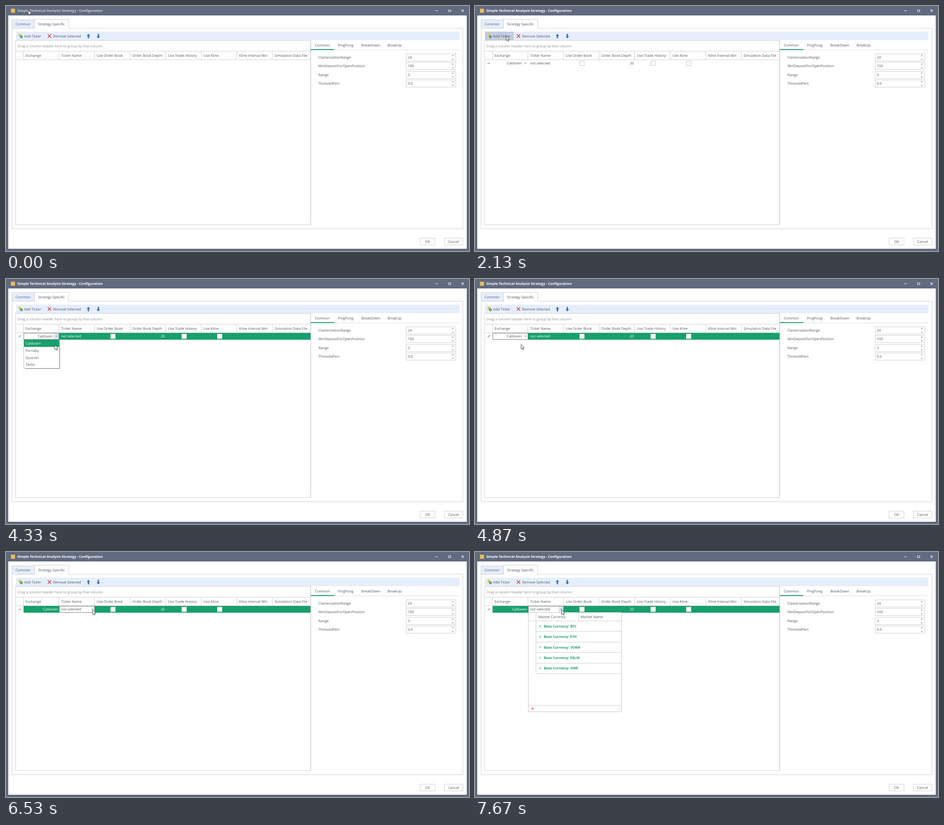
These frames come from a looping animation (1028 by 545 pixels, 8 s). An HTML page:

```html
<!DOCTYPE html>
<html lang="en">
<head>
<meta charset="utf-8">
<title>Strategy configuration</title>
<style>
  html, body { margin: 0; width: 100%; height: 100%; overflow: hidden; background: #626a80; }
  svg { display: block; width: 1028px; height: 545px; }
  text { font: 7.8px "Open Sans", "Noto Sans", sans-serif; fill: #50535f; text-rendering: geometricPrecision; white-space: pre; }
  .bold { font-weight: 700; font-size: 7.65px; }
  .end { text-anchor: end; }
  .mid { text-anchor: middle; }
  .hint { fill: #8d8d8d; }
  .blue { fill: #4c5a86; }
  .inv { fill: #fff; }
  .green { fill: #18a06b; }
</style>
</head>
<body>
<svg id="stage" viewBox="0 0 1028 545"></svg>
<script>
const LINE = '#cfcfd2', GREEN = '#18a06b', BAR = '#e6eefc', HOT = '#c4cde1';
const LOOP = 8000, STEP = 200 / 3;

const text = (x, y, s, cls = '') => `<text x="${x}" y="${y}" class="${cls}">${s}</text>`;
const fill = (x, y, w, h, c) => `<rect x="${x}" y="${y}" width="${w}" height="${h}" fill="${c}"/>`;
const box = (x, y, w, h, c = LINE, bg = '#fff') =>
  `<rect x="${x + .5}" y="${y + .5}" width="${w - 1}" height="${h - 1}" fill="${bg}" stroke="${c}"/>`;
const hline = (x, y, w, c = LINE) => fill(x, y, w, 1, c);
const vline = (x, y, h, c = LINE) => fill(x, y, 1, h, c);
const path = (d, c, w = 1) => `<path d="${d}" fill="none" stroke="${c}" stroke-width="${w}"/>`;
const shape = (d, c) => `<path d="${d}" fill="${c}"/>`;
const group = (id, ...parts) => `<g id="${id}">${parts.join('')}</g>`;
const dropArrow = (x, y = 126.5) => shape(`M${x - 2} ${y}h4l-2 2z`, '#6b6e78');

const columns = [[39, 'Exchange'], [118, 'Ticker Name'], [197, 'Use Order Book'], [276, 'Order Book Depth'],
  [355, 'Use Trade History'], [434, 'Use Kline'], [513, 'Kline Interval Min'], [592, 'Simulation Data File']];
const checks = [232, 390, 469];
const exchanges = ['Caldoven', 'Fornaby', 'Quorsel', 'Tavlin'];
const bases = ['BTC', 'ETH', 'VORN', 'KELM', 'XMR'];

const titleBar = () => [
  fill(0, 0, 1028, 545, '#626a80'),
  fill(5, 21, 1018, 519, '#fff'),
  fill(11, 6, 9, 9, '#e9bd55'),
  `<g id="title">${text(25, 13, 'Simple Technical Analysis Strategy - Configuration', 'bold inv')}</g>`,
  fill(953, 10, 6, 1, '#fff'),
  path('M982.5 8.5h5v4h-5z', '#fff'),
  path('M1011.3 7.8l5 5m0-5l-5 5', '#fff', 1.1)
].join('');

const tabs = () => [
  box(13, 49, 1002, 447),
  box(13, 30, 51, 20, LINE, BAR),
  text(21, 42.7, 'Common', 'blue'),
  box(63, 29, 77, 21), fill(64, 48, 75, 3, '#fff'),
  text(71.3, 42.7, 'Strategy Specific')
].join('');

const toolbar = () => [
  fill(22, 57, 985, 19, BAR),
  group('hot', fill(22, 57, 64, 19, HOT)),
  '<circle cx="31" cy="65" r="3.3" fill="#f0bd4c"/><circle cx="34.2" cy="68.6" r="3" fill="#2f9a62"/>',
  text(34.2, 70.3, '$', 'mid inv').replace('<text', '<text style="font-size:4.5px"'),
  text(40.3, 69.7, 'Add Ticker'),
  path('M92.8 63l7.4 7.6m0-7.6l-7.4 7.6', '#d9363c', 1.5),
  text(104.7, 69.7, 'Remove Selected'),
  shape('M183 62l4 4.4h-2.6v5.6h-2.8v-5.6h-2.6z', '#3668c0'),
  shape('M205 72l4-4.4h-2.6v-5.6h-2.8v5.6h-2.6z', '#3668c0')
].join('');

const grid = () => [
  box(21, 76, 656, 411),
  fill(676, 76, 1, 411, '#b9b9bd'),
  text(25.5, 92.4, 'Drag a column header here to group by that column', 'hint'),
  hline(22, 100, 654), hline(22, 119, 654),
  ...columns.map(([x, s]) => vline(x - 1, 101, 18) + text(x + 4.5, 112.9, s))
].join('');

const settings = () => [
  hline(677, 97, 330, '#dddde0'), fill(677, 96, 52, 2, GREEN),
  ...[[685.7, 'Common'], [737, 'PingPong'], [789, 'BreakDown'], [847, 'BreakUp']].map(([x, s]) => text(x, 90.2, s)),
  ...[['ClasterizationRange', '24'], ['MinDepositForOpenPosition', '100'], ['Range', '3'], ['ThresoldPerc', '0.6']]
    .map(([name, value], i) => {
      const y = Math.round(114 + i * 19.3);
      return text(693.7, y + 3, name) + box(888, y - 8, 111, 17) + text(892.3, y + 3, value) +
        shape(`M990 ${y - 3}h4l-2-2z`, '#73757d') + shape(`M990 ${y + 4}h4l-2 2z`, '#73757d');
    }),
  box(919, 516, 34, 16), text(936, 526.6, 'OK', 'mid'),
  box(973, 516, 42, 16), text(993.7, 526.6, 'Cancel', 'mid')
].join('');

const rowCells = (cls, edge) => [
  text(352.5, 130, '20', 'end ' + cls),
  ...checks.map(x => box(x, 122, 11, 11, edge))
].join('');

const rows = () => [
  group('plain',
    group('comboHot', fill(107, 121, 10, 13, HOT)),
    text(104.2, 130, exchanges[0], 'end'), dropArrow(112),
    text(122.5, 130, 'not selected'), rowCells('', '#c6c6c9')),
  group('selected', fill(39, 120, 637, 15, GREEN), rowCells('inv', '#fff')),
  group('editExchange',
    box(39, 120, 79, 15, '#75817c'),
    group('comboOpen', fill(107, 121, 10, 13, '#dbe4f4')),
    text(104.2, 130, exchanges[0], 'end'), dropArrow(112),
    text(122.5, 130, 'not selected', 'inv')),
  group('editTicker',
    text(115.5, 130, exchanges[0], 'end inv'),
    box(118, 120, 79, 15, '#75817c'),
    group('tickerOpen', fill(186, 121, 10, 13, '#dbe4f4')),
    text(122.5, 130, 'not selected'), dropArrow(191.5)),
  group('arrow', path('M26.8 127.5h6m-2.3-2.2l2.3 2.2l-2.3 2.2', '#85878e', .9)),
  group('pencil', path('M28.3 129.7l4.6-4.6', '#a2a4a9', 2))
].join('');

const exchangeList = () => group('exchangeList',
  fill(43, 138, 77, 62, '#9b9b9b'),
  box(39, 135, 80, 64, '#bdbdc0'),
  fill(40, 135, 78, 16, GREEN),
  ...exchanges.map((s, i) => text(43.3, 146 + i * 15.8, s, i ? '' : 'inv')));

const tickerList = () => group('tickerList',
  box(118, 134, 208, 222, '#c6c6c9'),
  hline(119, 153, 206), vline(135, 135, 136), vline(230, 135, 18),
  text(140.5, 146.8, 'Market Currency'), text(234.5, 146.8, 'Market Name'),
  ...bases.map((s, i) => {
    const y = 165 + i * 23.4;
    return path(`M143.6 ${y - 1.9}l2 1.9l-2 1.9`, GREEN, 1.1) +
      text(152.7, y + 2.8, 'Base Currency: ' + s, 'bold green') + hline(136, Math.round(y + 11.3), 189);
  }),
  hline(119, 341, 206),
  path('M126 346.3l4 4m0-4l-4 4', '#d9363c', 1.1),
  ...[[322, 346], [319, 349], [322, 349], [316, 352], [319, 352], [322, 352]]
    .map(([x, y]) => fill(x, y - .5, 1, 1, '#a5a5a8')));

const cursor = group('cursor',
  '<path d="M.4 .5V10.9L2.8 8.7L4.4 12.3L6 11.6L4.4 8.1H7.7Z" fill="#fff" stroke="#2b2b33" stroke-width=".85"/>');

document.getElementById('stage').innerHTML =
  titleBar() + tabs() + toolbar() + grid() + settings() + rows() + exchangeList() + tickerList() + cursor;

// Opacity of each part: [time, value] pairs, held until the next pair.
const tracks = {
  title: [[0, .66], [1730, 1]],
  hot: [[1800, 1], [2530, 0]],
  plain: [[2000, 1], [3800, 0]],
  comboHot: [[3270, 1], [3800, 0]],
  selected: [[3800, 1]],
  editExchange: [[3800, 1], [5800, 0]],
  comboOpen: [[3800, 1], [4730, 0]],
  exchangeList: [[3870, .4], [3930, .75], [4000, 1], [4730, .6], [4800, 0]],
  editTicker: [[5800, 1]],
  tickerOpen: [[6670, 1]],
  tickerList: [[6730, .4], [6800, .65], [6870, .85], [7670, 1]],
  arrow: [[2000, 1], [3800, 0], [5800, 1], [6670, 0]],
  pencil: [[3800, 1], [5800, 0], [6670, 1]]
};

// Pointer route: time, x, y.
const route = [
  [0, 49, 9], [133, 104, 109], [467, 104, 109], [600, 103, 112], [800, 94, 97], [1000, 76, 72], [1133, 69, 67],
  [1200, 69, 67], [1333, 69, 66], [2400, 69, 66], [2600, 91, 137], [2800, 91, 137], [3333, 110, 129],
  [3400, 110, 129], [3467, 111, 129], [3933, 111, 129], [4333, 108, 146], [4600, 106, 147], [4867, 102, 145],
  [5000, 102, 145], [5200, 164, 139], [5400, 164, 139], [5600, 183, 130], [5867, 184, 129], [6067, 184, 129],
  [6533, 192, 128], [LOOP, 192, 128]
];

const held = (track, t) => track.reduce((v, [at, next]) => t >= at ? next : v, 0);

function pointAt(t) {
  const i = Math.max(1, route.findIndex(p => p[0] >= t));
  const [t0, x0, y0] = route[i - 1], [t1, x1, y1] = route[i];
  const k = (t - t0) / (t1 - t0);
  return [Math.round(x0 + (x1 - x0) * k), Math.round(y0 + (y1 - y0) * k)];
}

const parts = Object.entries(tracks).map(([id, track]) => [document.getElementById(id), track]);
const pointer = document.getElementById('cursor');
const start = performance.now();

function draw() {
  const now = Math.max(0, performance.now() - start) % LOOP;
  const t = Math.min(LOOP, Math.floor((now + 4) / STEP) * STEP);
  for (const [el, track] of parts) {
    const v = held(track, t + 4);
    el.style.opacity = v;
    el.style.display = v ? '' : 'none';
  }
  pointer.setAttribute('transform', `translate(${pointAt(t)})`);
  requestAnimationFrame(draw);
}
draw();
</script>
</body>
</html>
```
